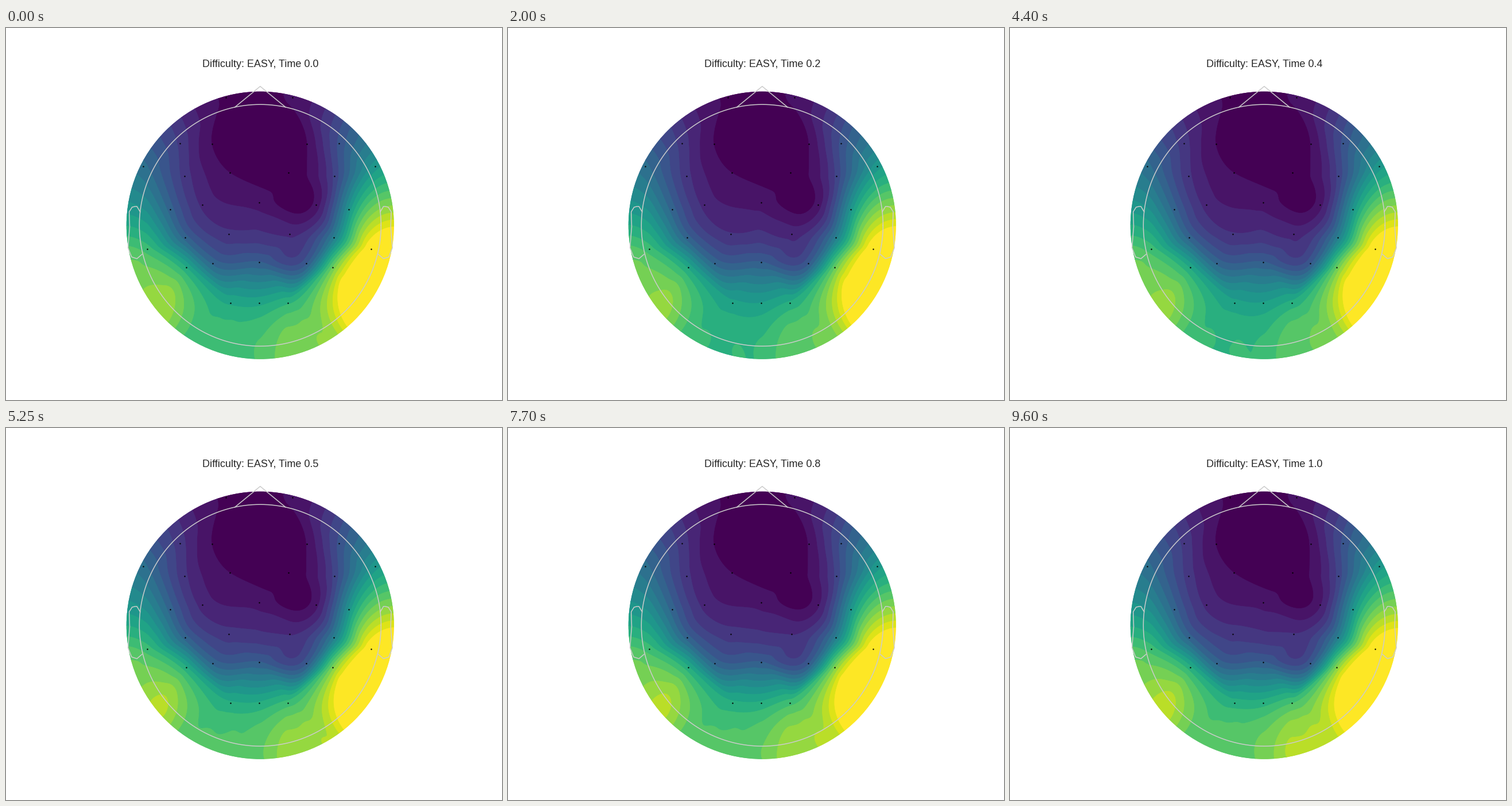
Recreate the animation shown at these times as a matplotlib script. Size 864 px wide and 648 px high, loop 10 s.

```python
import numpy as np
import matplotlib.pyplot as plt
from matplotlib.animation import FuncAnimation
from matplotlib.patches import Circle
from matplotlib.tri import Triangulation

plt.rcParams["font.family"] = "Liberation Sans"

W, H, DPI = 864, 648, 108
LOOP, STEP, UPDATE, LAST_UPDATE = 10000, 50, 150, 9600
CX, CY = 442.8, 343.7
HEAD, CLIP = 210.5, 233.0
MIDLINE = 441
RING, N_RING = 331.0, 20
BANDS = 20
GREY = "#cccccc"

# mirrored electrodes: distance from the midline, y, left and right level
PAIRS = {
    "Fp1 Fp2": (58, 120.5, 0.85, 1.2),
    "F7 F8": (138.5, 201, 3.8, 5.2),
    "F3 F4": (82.5, 202, 1.0, 0.95),
    "FT9 FT10": (202, 240.5, 7.3, 10.5),
    "FC5 FC6": (130.5, 257.5, 3.6, 4.2),
    "FC1 FC2": (51, 252, 1.0, 0.4),
    "T7 T8": (155.5, 316, 6.6, 10.2),
    "C3 C4": (99, 308, 2.8, 1.4),
    "CP5 CP6": (129.5, 365, 6.6, 8.5),
    "CP1 CP2": (53, 359, 3.3, 2.8),
    "TP9 TP10": (195, 385, 13.5, 20.4),
    "P7 P8": (127.5, 417, 12.1, 15.0),
    "P3 P4": (81.5, 410, 6.8, 5.8),
    "O1 O2": (50, 478.5, 11.8, 12.8),
}
CENTRAL = {"Cz": (304, 1.65), "Pz": (408, 6.1), "Oz": (479, 11.7)}

# turning points of the posterior rhythm, evenly spaced in time
TURNS = [0, -.3, -.7, -.6, -.6, .6, -.6, .55, 0, 1]
TURN_MS = 1100

# how strongly each electrode follows the rhythm, the slow rise and the frontal dip
RHYTHM = {"O1": .8, "Oz": 1, "O2": 1, "P7": .35, "P8": .5, "CP1": .3, "CP2": .3}
RISE = {"O2": .3, "P8": .4, "C4": .5, "F4": .15, "FC6": .15}
DIP = {"FC5": -.3, "F7": -.3, "C3": -.15}


def place_sensors():
    names, xy, levels = [], [], []
    for pair, (dx, y, left, right) in PAIRS.items():
        names += pair.split()
        xy += [(MIDLINE - dx, y), (MIDLINE + dx, y)]
        levels += [left, right]
    for name, (y, level) in CENTRAL.items():
        names.append(name)
        xy.append((MIDLINE, y))
        levels.append(level)
    return names, np.array(xy, float), np.array(levels)


NAMES, SENSOR_XY, REST = place_sensors()


class CloughTocher:
    """C1 cubic interpolation over a triangulation, sampled at fixed points."""

    def __init__(self, xy, gx, gy):
        self.tri = Triangulation(xy[:, 0], xy[:, 1])
        self.xy, self.t = xy, self.tri.triangles
        self.corners = xy[self.t]
        self.where = self.tri.get_trifinder()(gx, gy)
        self.bary = self.barycentric(self.where, np.stack([gx, gy], -1))
        self.skew = self.edge_skew()
        self.system = self.gradient_system()

    def barycentric(self, index, p):
        a, b, c = np.moveaxis(self.corners[index], -2, 0)
        ab, ac, ap = b - a, c - a, p - a
        det = ab[..., 0] * ac[..., 1] - ab[..., 1] * ac[..., 0]
        u = (ap[..., 0] * ac[..., 1] - ap[..., 1] * ac[..., 0]) / det
        v = (ab[..., 0] * ap[..., 1] - ab[..., 1] * ap[..., 0]) / det
        return np.array([1 - u - v, u, v])

    def edge_skew(self):
        """Cross-edge direction weights, one per corner's opposite edge."""
        centres = self.corners.mean(axis=1)
        every = np.arange(len(self.t))
        skew = []
        for k in range(3):
            i, j = (k + 1) % 3, (k + 2) % 3
            other = self.tri.neighbors[:, i]
            c = self.barycentric(every, centres[other])
            inner = other >= 0
            den = np.where(inner, 2 - 3 * c[j] - 3 * c[i], 1)
            skew.append(np.where(inner, (2 * c[j] + c[i] - 1) / den, -0.5))
        return skew

    def gradient_system(self):
        n = len(self.xy)
        m = np.zeros((2 * n, 2 * n))
        for a, b in self.tri.edges:
            e = self.xy[b] - self.xy[a]
            block = np.outer(e, e) / np.linalg.norm(e) ** 3
            sa, sb = slice(2 * a, 2 * a + 2), slice(2 * b, 2 * b + 2)
            m[sa, sa] += 4 * block
            m[sb, sb] += 4 * block
            m[sa, sb] += 2 * block
            m[sb, sa] += 2 * block
        return m

    def gradients(self, f):
        a, b = self.tri.edges.T
        e = self.xy[b] - self.xy[a]
        pull = 6 * ((f[b] - f[a]) / np.linalg.norm(e, axis=1) ** 3)[:, None] * e
        rhs = np.zeros_like(self.xy)
        np.add.at(rhs, a, pull)
        np.add.at(rhs, b, pull)
        return np.linalg.solve(self.system, rhs.ravel()).reshape(-1, 2)

    def __call__(self, f):
        grad = self.gradients(f)[self.t]
        a = f[self.t].T
        pts = self.corners

        def toward(i, j):
            return a[i] + ((pts[:, j] - pts[:, i]) * grad[:, i]).sum(-1) / 3

        p = [toward(i, (i + 1) % 3) for i in range(3)]
        q = [toward(i, (i + 2) % 3) for i in range(3)]
        m = [(a[i] + p[i] + q[i]) / 3 for i in range(3)]
        e = []
        for k in range(3):
            i, j = (k + 1) % 3, (k + 2) % 3
            e.append((self.skew[k] * (-a[i] + 3 * p[i] - 3 * q[j] + a[j])
                      - a[i] + 2 * p[i] - q[j] + m[i] + m[j]) / 2)
        n = [(e[(i + 1) % 3] + e[(i + 2) % 3] + m[i]) / 3 for i in range(3)]
        centre = sum(n) / 3

        w = self.where
        low = self.bary.min(axis=0)
        b, c = self.bary - low, 3 * low
        z = c ** 3 * centre[w]
        for i in range(3):
            j, k = (i + 1) % 3, (i + 2) % 3
            z = z + b[i] ** 3 * a[i][w]
            z = z + 3 * b[i] ** 2 * (b[j] * p[i][w] + b[k] * q[i][w] + c * m[i][w])
            z = z + 3 * b[i] * c ** 2 * n[i][w] + 6 * b[j] * b[k] * c * e[i][w]
        return z


angles = np.arange(N_RING) * 2 * np.pi / N_RING
ring_xy = np.column_stack([CX + RING * np.cos(angles), CY + RING * np.sin(angles)])
span = np.linspace(-CLIP - 3, CLIP + 3, 170)
grid_x, grid_y = np.meshgrid(CX + span, CY + span)
surface = CloughTocher(np.vstack([SENSOR_XY, ring_xy]), grid_x, grid_y)


def ring_weights():
    """Each outer point takes the mean of the electrodes it touches."""
    n = len(NAMES)
    touch = np.zeros((N_RING, n))
    for a, b in surface.tri.edges:
        lo, hi = min(a, b), max(a, b)
        if lo < n <= hi:
            touch[hi - n, lo] = 1
    touch[touch.sum(axis=1) == 0] = 1
    return touch / touch.sum(axis=1, keepdims=True)


TO_RING = ring_weights()


def follow(weights):
    return np.array([weights.get(name, 0) for name in NAMES])


def rhythm(ms):
    """Ease with a half cosine from one turning point to the next."""
    k, part = divmod(ms / TURN_MS, 1)
    a, b = TURNS[int(k)], TURNS[int(k) + 1]
    return a + (b - a) * (1 - np.cos(np.pi * part)) / 2


def levels_at(ms):
    t = ms / LOOP
    v = (REST + rhythm(ms) * follow(RHYTHM) + t * follow(RISE)
         + np.sin(np.pi * t) * follow(DIP))
    return np.concatenate([v, TO_RING @ v])


fig = plt.figure(figsize=(W / DPI, H / DPI), dpi=DPI, facecolor="white")
ax = fig.add_axes([0, 0, 1, 1])
ax.set_xlim(0, W)
ax.set_ylim(H, 0)
ax.axis("off")

title = ax.text(CX, 68, "", ha="center", va="baseline", fontsize=12, color="#262626")
rim = Circle((CX, CY), CLIP, transform=ax.transData)


def outline(x, y):
    ax.plot(CX + HEAD * np.asarray(x), CY - HEAD * np.asarray(y),
            color=GREY, lw=1, zorder=3)


turn = np.linspace(0, 2 * np.pi, 201)
outline(np.cos(turn), np.sin(turn))
nose = np.deg2rad(12)
nose_y = np.sqrt(1 - nose ** 2)
outline([-nose, 0, nose], [nose_y, 1.15, nose_y])
ear_x = 2 * np.array([.497, .510, .518, .530, .542, .540, .547, .532, .510, .489])
ear_y = 2 * np.array([.056, .078, .078, .075, .056, -.006, -.093, -.131, -.138, -.120])
outline(ear_x, ear_y)
outline(-ear_x, ear_y)
ax.plot(*SENSOR_XY.T, "o", color="black", ms=1.6, mew=0, zorder=4)

COLORS = plt.get_cmap("viridis")(np.linspace(0, 1, BANDS))
shown = {"time": None, "maps": []}


def draw_map(ms):
    for layer in shown["maps"]:
        layer.remove()
    z = surface(levels_at(ms))
    shown["maps"] = []
    # the smooth layer on top of a hard one leaves no seams between bands
    for order, smooth in ((1, False), (2, True)):
        layer = ax.contourf(grid_x, grid_y, z, levels=np.arange(1, BANDS),
                            colors=COLORS, extend="both", antialiased=smooth,
                            zorder=order)
        layer.set_clip_path(rim)
        shown["maps"].append(layer)
    shown["time"] = ms


def draw(i):
    ms = i * STEP
    update = min(ms // UPDATE * UPDATE, LAST_UPDATE)
    if update != shown["time"]:
        draw_map(update)
    title.set_text(f"Difficulty: EASY, Time {ms / LOOP:.1f}")
    return []


anim = FuncAnimation(fig, draw, frames=LOOP // STEP, interval=STEP, repeat=True)
plt.show()
```
